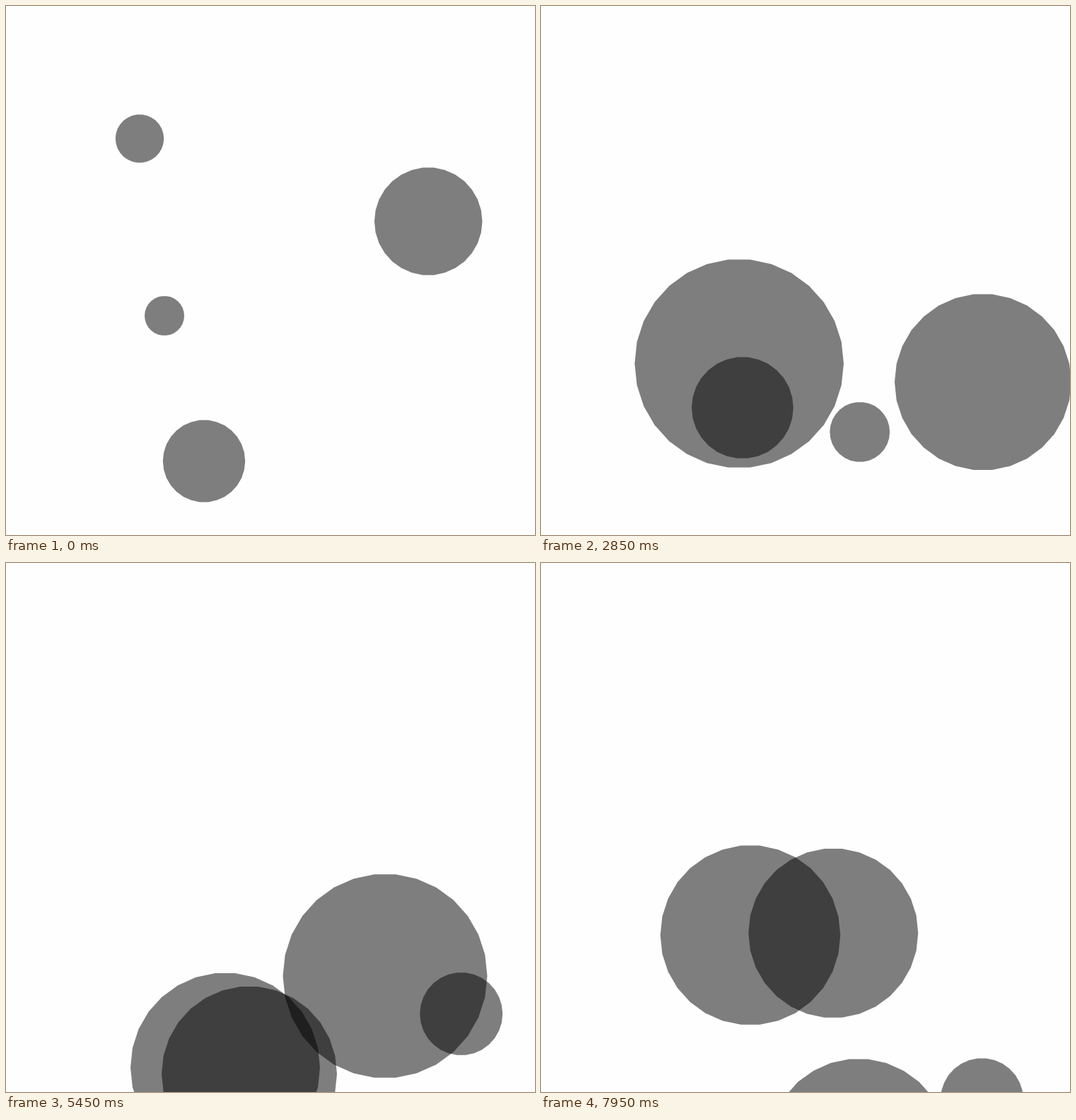
An HTML page with a canvas that plays this animation: 748x748 px, repeating every 8000 ms.

```html
<!DOCTYPE html>
<html lang="en">
<head>
<meta charset="utf-8">
<title>Drifting discs</title>
<style>
  html, body { margin: 0; width: 100%; height: 100%; overflow: hidden; background: #fefefe; }
  canvas { display: block; width: 748px; height: 748px; }
</style>
</head>
<body>
<canvas id="stage" width="748" height="748"></canvas>
<script>
const ctx = document.getElementById('stage').getContext('2d');
const SIZE = 748, LOOP = 8000, STEP = 50, SIDES = 30;
const TRAVEL = 450; // ms from the start point to the second point

// disc: radius, start x, start y, x and y after TRAVEL
const bursts = [
  { start: 0, end: 700, discs: [
    [34.2, 189, 187.5, 400, 560],
    [76.3, 597.2, 304.5, 530, 600],
    [28, 224, 438, 420, 680],
    [58.2, 280, 643.5, 400, 760]
  ] },
  { start: 2500, end: 3250, discs: [
    [147.8, 106, 210.2, 330, 590],
    [71.9, 22.2, 386.5, 360, 620],
    [42.4, 348.5, 435.5, 480, 650],
    [124.9, 677, 257.8, 610, 610]
  ] },
  { start: 5000, end: 5750, discs: [
    [134, 240, 265.8, 310, 713.3],
    [124, 344, 313.2, 344, 722.4],
    [144.5, 69.5, 533, 536, 584],
    [58.5, 393.3, 543.7, 643.7, 637.5]
  ] },
  { start: 7500, end: 8250, discs: [
    [127.3, 40.2, 264.2, 296, 526.2],
    [120, 311.5, 108, 413.3, 523.3],
    [127.7, 509.8, 715, 449, 828.5],
    [58.6, 308.6, 642.6, 623.5, 758.8]
  ] }
];

function polygon(x, y, r) {
  ctx.beginPath();
  for (let i = 0; i < SIDES; i++) {
    const a = i * 2 * Math.PI / SIDES;
    ctx.lineTo(x + r * Math.cos(a), y + r * Math.sin(a));
  }
  ctx.fill();
}

function draw(time) {
  ctx.fillStyle = '#fefefe';
  ctx.fillRect(0, 0, SIZE, SIZE);
  ctx.fillStyle = 'rgba(0, 0, 0, 0.5)';
  for (const { start, end, discs } of bursts) {
    if (time < start || time >= end) continue;
    const k = (time - start) / TRAVEL;
    for (const [r, x0, y0, x1, y1] of discs) {
      polygon(x0 + (x1 - x0) * k, y0 + (y1 - y0) * k, r);
    }
  }
}

const origin = performance.now();
function tick() {
  const time = (performance.now() - origin) % LOOP;
  draw(Math.floor(time / STEP) * STEP);
  requestAnimationFrame(tick);
}
tick();
</script>
</body>
</html>
```
